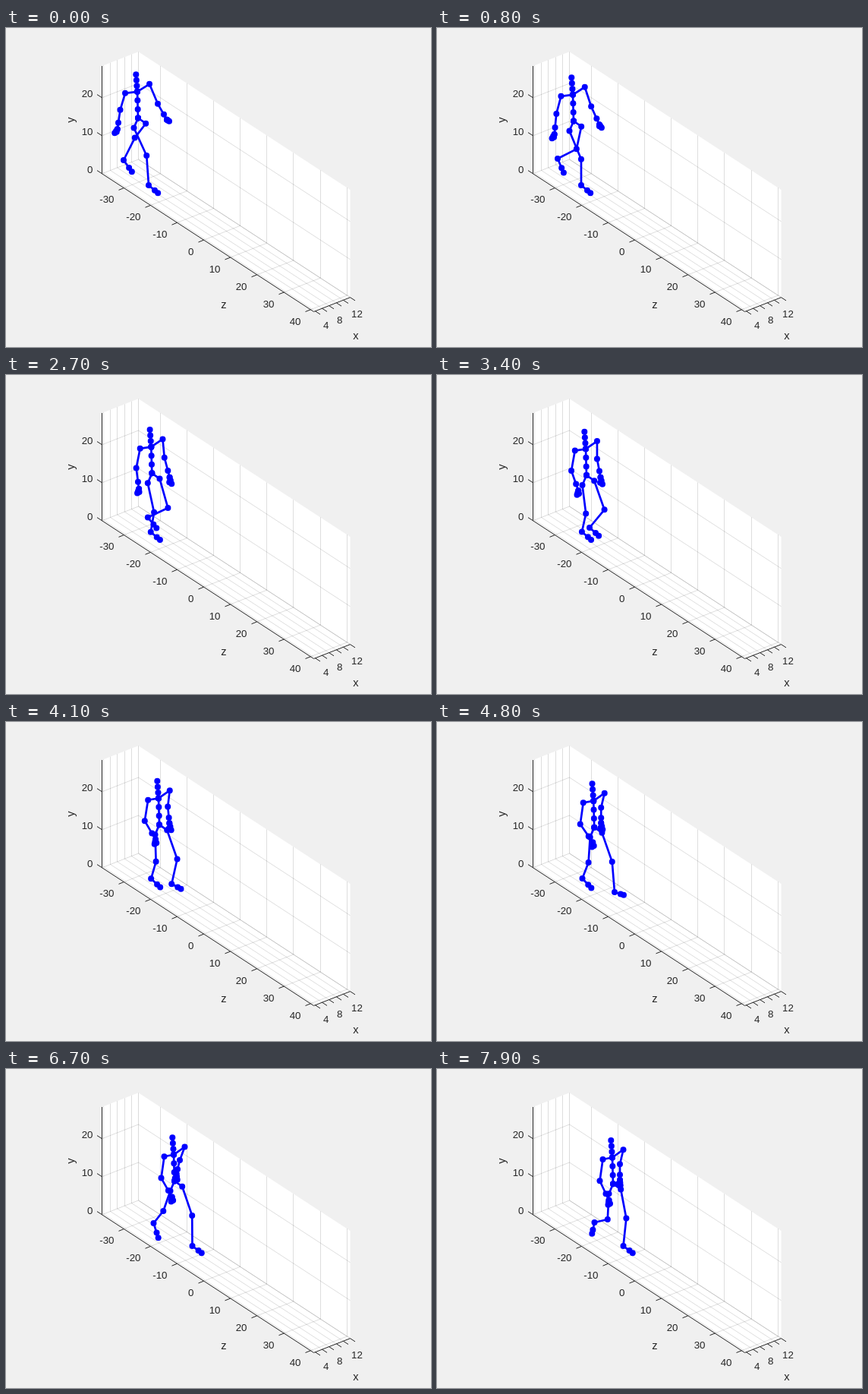
Recreate the animation shown at these times as an HTML page with a canvas. Size 560 by 420 pixels, loop 8 s.

```html
<!DOCTYPE html>
<html lang="en">
<head>
<meta charset="utf-8">
<title>Walking skeleton</title>
<style>
  html, body { margin: 0; width: 100%; height: 100%; overflow: hidden; background: #f0f0f0; }
  canvas { display: block; }
</style>
</head>
<body>
<canvas id="stage" width="560" height="420"></canvas>
<script>
const ctx = document.getElementById('stage').getContext('2d');
const LOOP = 8000, STEP = 100;
const INK = '#262626', GRID = 'rgba(38,38,38,0.15)', BLUE = '#0000ff';
const FONT = '"Liberation Sans", Arial, sans-serif';

const add = (p, q) => [p[0] + q[0], p[1] + q[1]];
const scale = (p, k) => [p[0] * k, p[1] * k];
const mix = (p, q, k) => add(scale(p, 1 - k), scale(q, k));

// Keys are [seconds, ...values]; a monotone cubic keeps planted feet still.
function ease(t, keys) {
  const last = keys.length - 1;
  const s = Math.min(Math.max(t, keys[0][0]), keys[last][0]);
  let i = 0;
  while (i < last - 1 && s >= keys[i + 1][0]) i++;
  const h = keys[i + 1][0] - keys[i][0], u = (s - keys[i][0]) / h;
  return keys[0].slice(1).map((_, n) => {
    const v = k => keys[k][n + 1];
    const secant = k => (v(k + 1) - v(k)) / (keys[k + 1][0] - keys[k][0]);
    const slope = k => {
      if (k === 0 || k === last) return secant(Math.min(k, last - 1));
      const a = secant(k - 1), b = secant(k);
      return a * b <= 0 ? 0 : 2 * a * b / (a + b);
    };
    return v(i) + (v(i + 1) - v(i)) * u * u * (3 - 2 * u)
      + h * u * (1 - u) * ((1 - u) * slope(i) - u * slope(i + 1));
  });
}

// A bone swinging along z, in degrees from straight down, as seen on screen.
function bone(length, degrees) {
  const a = degrees * Math.PI / 180;
  const z = length * Math.sin(a), down = length * Math.cos(a);
  return [3.51 * z, 2.29 * z + 5 * down];
}

// Offsets are from the parent joint; ankles move in stage pixels.
const ROOT = [[0, 174, 118.5], [0.8, 180, 122.5], [3.4, 197, 132], [6.7, 222, 147.5], [7.9, 232, 151.2]];
const CHEST = [-1, -34.7], HEAD = [-1.7, -22.6];

const leftLeg = {
  hip: [-5.5, 13],
  thigh: [[0, 43], [0.8, 39], [4.8, -5], [6.7, -22], [7.9, -4]],
  ankle: [[0, 188, 207], [0.8, 190, 207], [4.8, 191.5, 206], [6.7, 194.5, 203], [7.9, 207.5, 202]],
  foot: [[3.4, 82], [4.8, 74], [6.7, 30], [7.9, -15]]
};
const rightLeg = {
  hip: [10.2, 7.2],
  thigh: [[0, -36], [1.9, 11], [3.4, 33], [6.7, 32], [7.9, 17]],
  ankle: [[0, 155, 174], [0.8, 159, 172], [1.9, 173, 176], [3.4, 201, 201], [4.8, 234, 224], [5.7, 245.5, 233]],
  foot: [[0, 62], [0.8, 40], [3.4, 81], [4.8, 103], [5.8, 86]]
};
const leftArm = {
  shoulder: [[0, -16, 2], [6.7, -12.5, 2.5]],
  upper: [[0, -6.5, 22], [4.8, -4, 28.3]],
  lower: [[0, -2.5, 17], [1.9, -0.5, 19], [4.8, 11, 16], [7.9, 8, 17]],
  hand: [[0, -3.5, 5], [4.8, -1, 6]],
  thumb: [2.5, -1.5]
};
const rightArm = {
  shoulder: [[0, 16, -10], [4.8, 14.5, -10.3]],
  upper: [[0, 11, 26], [3.4, 0, 23.5], [4.8, -4.5, 19], [6.7, -6.5, 17.5], [7.9, -4.5, 19]],
  lower: [[0, 8, 14], [1.9, 6, 18], [4.8, 0, 13.5], [6.7, -3, 12], [7.9, 0, 14]],
  hand: [[0, 3, 2], [3.4, 2.5, 9], [7.9, 0.7, 7]],
  thumb: [-3, -2]
};

function line(points, color, width) {
  ctx.beginPath();
  points.forEach(p => ctx.lineTo(...p));
  ctx.strokeStyle = color;
  ctx.lineWidth = width;
  ctx.stroke();
}

function chain(points) {
  line(points, BLUE, 2.7);
  ctx.fillStyle = BLUE;
  for (const [x, y] of points) {
    ctx.beginPath();
    ctx.arc(x, y, 4, 0, 2 * Math.PI);
    ctx.fill();
  }
}

function drawLeg(root, leg, t) {
  const hip = add(root, leg.hip);
  const knee = add(hip, bone(7, ease(t, leg.thigh)[0]));
  const ankle = ease(t, leg.ankle);
  const [pitch] = ease(t, leg.foot);
  chain([root, hip, knee, ankle, add(ankle, bone(2.3, pitch)), add(ankle, bone(3.5, pitch))]);
}

function drawArm(chest, arm, t) {
  const lower = ease(t, arm.lower);
  const shoulder = add(chest, ease(t, arm.shoulder));
  const elbow = add(shoulder, ease(t, arm.upper));
  const forearm = add(elbow, lower);
  const wrist = add(forearm, scale(lower, 0.5));
  const tip = add(wrist, ease(t, arm.hand));
  chain([chest, shoulder, elbow, forearm, wrist, mix(wrist, tip, 0.5), tip]);
  chain([wrist, add(tip, arm.thumb)]);
}

function drawWalker(t) {
  ctx.lineJoin = 'round';
  const root = ease(t, ROOT), chest = add(root, CHEST), head = add(chest, HEAD);
  const thirds = (p, q) => [0, 1, 2, 3].map(i => mix(p, q, i / 3));
  chain([...thirds(head, chest), ...thirds(chest, root)]);
  drawArm(chest, leftArm, t);
  drawArm(chest, rightArm, t);
  drawLeg(root, leftLeg, t);
  drawLeg(root, rightLeg, t);
}

// Axes box: a spans x, b spans y, c spans z, each from 0 to 1.
// Columns snap to whole pixels so that upright lines stay crisp.
const at = (a, b, c) => [
  Math.floor(126.5 + 48 * a + 279 * c) + 0.5,
  191.8 - 18.8 * a - 141.8 * b + 181.7 * c
];
const fracX = x => 1 - (14 - x) * 4.62 / 48;
const fracY = y => y * 5 / 141.8;
const fracZ = z => (z + 38.2) * 3.513 / 279;

function face(points) {
  ctx.beginPath();
  points.forEach(p => ctx.lineTo(...p));
  ctx.fillStyle = '#fff';
  ctx.fill();
}

function text(s, x, y, align, size = 13.33) {
  ctx.font = size + 'px ' + FONT;
  ctx.textAlign = align;
  ctx.fillStyle = INK;
  ctx.fillText(s, x, y);
}

const tick = (p, dx, dy) => line([p, add(p, [dx, dy])], INK, 1);

function drawAxes() {
  const xs = [4, 6, 8, 10, 12, 14], ys = [0, 10, 20];
  const zs = [-30, -20, -10, 0, 10, 20, 30, 40];
  face([at(0, 0, 0), at(0, 1, 0), at(1, 1, 0), at(1, 0, 0)]);
  face([at(1, 0, 0), at(1, 1, 0), at(1, 1, 1), at(1, 0, 1)]);
  face([at(0, 0, 0), at(1, 0, 0), at(1, 0, 1), at(0, 0, 1)]);

  for (const a of xs.map(fracX)) line([at(a, 1, 0), at(a, 0, 0), at(a, 0, 1)], GRID, 1);
  for (const b of ys.map(fracY)) line([at(0, b, 0), at(1, b, 0), at(1, b, 1)], GRID, 1);
  for (const c of zs.map(fracZ)) line([at(0, 0, c), at(1, 0, c), at(1, 1, c)], GRID, 1);

  line([at(0, 1, 0), at(0, 0, 0), at(0, 0, 1), at(1, 0, 1)], INK, 1);

  xs.forEach((x, i) => {
    const p = at(fracX(x), 0, 1);
    tick(p, 6.5, 4.2);
    if (i % 2 === 0) text(x, p[0] + 10.5, p[1] + 23, 'left');
  });
  for (const y of ys) {
    const p = at(0, fracY(y), 0);
    tick(p, -6.5, -4.2);
    text(y, 114.5, p[1] - 1, 'right');
  }
  for (const z of zs) {
    const p = at(0, 0, fracZ(z));
    tick(p, -7, 2.8);
    text(z, p[0] - 13, p[1] + 19.8, 'right');
  }

  text('x', 461, 410, 'center', 14.67);
  text('z', 287, 369, 'center', 14.67);
  ctx.save();
  ctx.translate(90, 121);
  ctx.rotate(-Math.PI / 2);
  text('y', 0, 0, 'center', 14.67);
  ctx.restore();
}

const start = performance.now();
function render() {
  const elapsed = (performance.now() - start) % LOOP;
  ctx.fillStyle = '#f0f0f0';
  ctx.fillRect(0, 0, 560, 420);
  drawAxes();
  drawWalker(Math.floor(elapsed / STEP) * STEP / 1000);
  requestAnimationFrame(render);
}
render();
</script>
</body>
</html>
```
